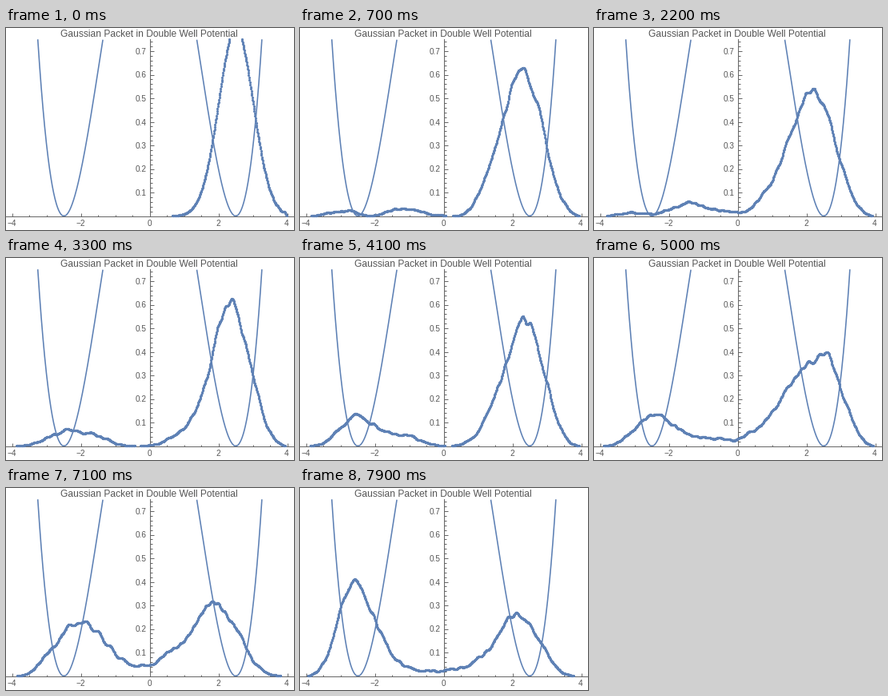
A matplotlib script for the animation above (8000 ms loop, 360 px wide and 253 px high).

```python
import matplotlib.pyplot as plt
import numpy as np
from matplotlib.animation import FuncAnimation
from matplotlib.transforms import ScaledTranslation

W, H = 360, 253
DPI = 64
PX = 72 / DPI  # one pixel in points
FRAMES, INTERVAL = 80, 100
BLUE, LINE, TEXT = "#5e81b5", "#666666", "#555555"
WALL, TOP, MODES = 4.0, 0.75, 90
plt.rcParams["font.family"] = "Liberation Sans"

# A few densities, by time step, that fix the mass and the time step
PROBE_X = np.array([-1.6, 0, 1.2, 2.8])
PROBES = {
    14: (0.029, 0.004, 0.07, 0.58),
    22: (0.045, 0.022, 0.205, 0.36),
    33: (0.04, 0.002, 0.118, 0.43),
    50: (0.08, 0.052, 0.15, 0.30),
    62: (0.20, 0.015, 0.065, 0.325),
    79: (0.145, 0.014, 0.10, 0.165),
}


def potential(x):
    return 0.039 * (x**2 - 6.25) ** 2


def packet(x):
    return (2 / np.pi) ** 0.25 * np.exp(-((x - 2.5) ** 2))


def box_modes(x):
    return np.sin(np.outer(x + WALL, wave)) / np.sqrt(WALL)


wave = np.arange(1, MODES + 1) * np.pi / (2 * WALL)
x = np.linspace(-WALL, WALL, 801)
dx = x[1] - x[0]
modes = box_modes(x)
v_matrix = modes.T @ (potential(x)[:, None] * modes) * dx
start = modes.T @ packet(x) * dx


def solve(mass):
    """Energies, and eigenstates scaled by their share of the packet."""
    energy, vecs = np.linalg.eigh(np.diag(wave**2 / (2 * mass)) + v_matrix)
    return energy, vecs * (vecs.T @ start)


def calibrate(low=20):
    """Mass and time step whose evolution passes closest to the probes."""
    probe_modes = box_modes(PROBE_X)
    steps = np.arange(0.5, 1.8, 0.002)
    best = (np.inf, 1.0, 1.0)
    for mass in np.arange(0.7, 1.4, 0.01):
        energy, states = solve(mass)
        states = (probe_modes @ states[:, :low]).T
        error = np.zeros(len(steps))
        for n, seen in PROBES.items():
            phase = np.exp(-1j * n * np.outer(steps, energy[:low]))
            error += ((np.abs(phase @ states) ** 2 - seen) ** 2).sum(axis=1)
        i = error.argmin()
        best = min(best, (error[i], mass, steps[i]))
    return best[1:]


mass, dt = calibrate()
energy, states = solve(mass)
states = modes @ states


def density(n):
    return np.abs(states @ np.exp(-1j * energy * dt * n)) ** 2


fig = plt.figure(figsize=(W / DPI, H / DPI), dpi=DPI, facecolor="white")
x0, y0, unit, height = 179.8, 235.5, 42.95, 221.25
ax = fig.add_axes([0, 1 - y0 / H, 1, height / H], facecolor="none")
for side in ("top", "right"):
    ax.spines[side].set_visible(False)
ax.spines["left"].set_position(("data", 0))
for side in ("left", "bottom"):
    ax.spines[side].set(color=LINE, linewidth=PX)

y_ticks = np.arange(1, 8) / 10
ax.set_xticks(range(-4, 5, 2))
ax.set_xticks(np.arange(-4, 4.1, 0.5), minor=True)
ax.set_yticks(y_ticks, [f"{y:.1f}" for y in y_ticks])
ax.set_yticks(np.arange(1, 38) / 50, minor=True)
ax.tick_params(which="both", direction="in", width=PX, color=LINE)
ax.tick_params(which="major", length=4.5 * PX, labelsize=10 * PX,
               labelcolor=TEXT)
ax.tick_params(which="minor", length=2.5 * PX)
ax.tick_params(axis="x", pad=5 * PX)
ax.tick_params(axis="y", pad=4 * PX)
ax.set_xlim(-x0 / unit, (W - x0) / unit)
ax.set_ylim(0, TOP)
nudge = ScaledTranslation(-0.8 / DPI, 0, fig.dpi_scale_trans)
for label in ax.get_xticklabels():
    label.set_transform(label.get_transform() + nudge)
fig.text(179 / W, 1 - 11 / H, "Gaussian Packet in Double Well Potential",
         size=12 * PX, color=TEXT, ha="center", va="baseline")

v = potential(x)
ax.plot(x, np.where(v <= TOP, v, np.nan), color=BLUE, lw=1.6 * PX,
        clip_on=False)
dots, = ax.plot([], [], "o", color=BLUE, ms=3.2 * PX, mew=0, clip_on=False,
                zorder=3)


def draw(n):
    y = density(n)
    shown = (y > 0.0008) & (y <= TOP)
    dots.set_data(x[shown], y[shown])
    return dots,


anim = FuncAnimation(fig, draw, frames=FRAMES, interval=INTERVAL, repeat=True)
plt.show()
```
